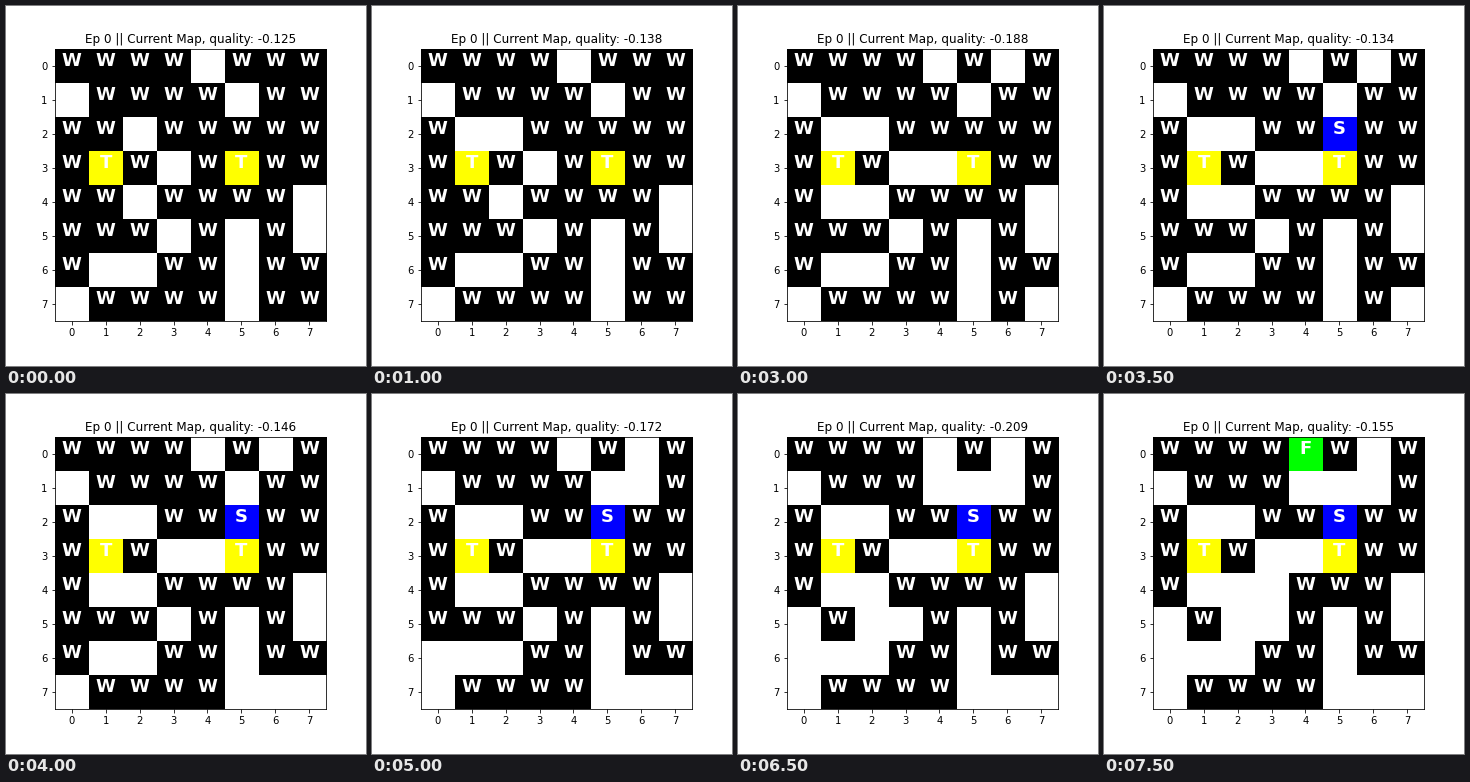
A matplotlib script for the animation above (8 s loop, 360 px wide and 360 px high).

```python
import numpy as np
import matplotlib.pyplot as plt
from matplotlib.animation import FuncAnimation

START = [
    "WWWW.WWW",
    ".WWWW.WW",
    "WW.WWWWW",
    "WTW.WTWW",
    "WW.WWWW.",
    "WWW.W.W.",
    "W..WW.WW",
    ".WWWW.WW",
]
COLORS = {"W": (0, 0, 0), ".": (255, 255, 255), "T": (255, 255, 0),
          "S": (0, 0, 255), "F": (0, 255, 0)}

# One map edit per step: row, column, new tile, resulting quality
EDITS = [
    (2, 1, ".", -0.138), (4, 1, ".", -0.15), (3, 4, ".", -0.162),
    (7, 7, ".", -0.175), (0, 6, ".", -0.188), (2, 5, "S", -0.134),
    (7, 6, ".", -0.146), (6, 0, ".", -0.159), (1, 6, ".", -0.172),
    (5, 2, ".", -0.184), (5, 0, ".", -0.196), (1, 4, ".", -0.209),
    (0, 4, "F", -0.143), (4, 3, ".", -0.155),
]
STEP_MS = 500
SIZE = len(START)

plt.rcParams["font.family"] = "DejaVu Sans"
fig = plt.figure(figsize=(5, 5), dpi=72, facecolor="white")
ax = fig.add_axes([0.135, 0.125, 0.755, 0.755])
image = ax.imshow(np.zeros((SIZE, SIZE, 3), np.uint8), interpolation="nearest")
ax.set_xticks(range(SIZE))
ax.set_yticks(range(SIZE))
title = ax.set_title("", fontsize=12)
labels = [[ax.text(col, row, "", ha="center", color="white",
                   fontsize=18, fontweight="bold")
           for col in range(SIZE)] for row in range(SIZE)]


def state_at(step):
    """Return the tile map and its quality after the edits made so far."""
    tiles = [list(row) for row in START]
    quality = -0.125
    for row, col, tile, quality in EDITS[:max(step - 1, 0)]:
        tiles[row][col] = tile
    return tiles, quality


def update(step):
    tiles, quality = state_at(step)
    image.set_data(np.array([[COLORS[t] for t in row] for row in tiles], np.uint8))
    for label_row, tile_row in zip(labels, tiles):
        for label, tile in zip(label_row, tile_row):
            label.set_text("" if tile == "." else tile)
    title.set_text(f"Ep 0 || Current Map, quality: {quality}")
    return [image, title]


anim = FuncAnimation(fig, update, frames=len(EDITS) + 2, interval=STEP_MS,
                     repeat=True, repeat_delay=0, blit=False)
plt.show()
```
